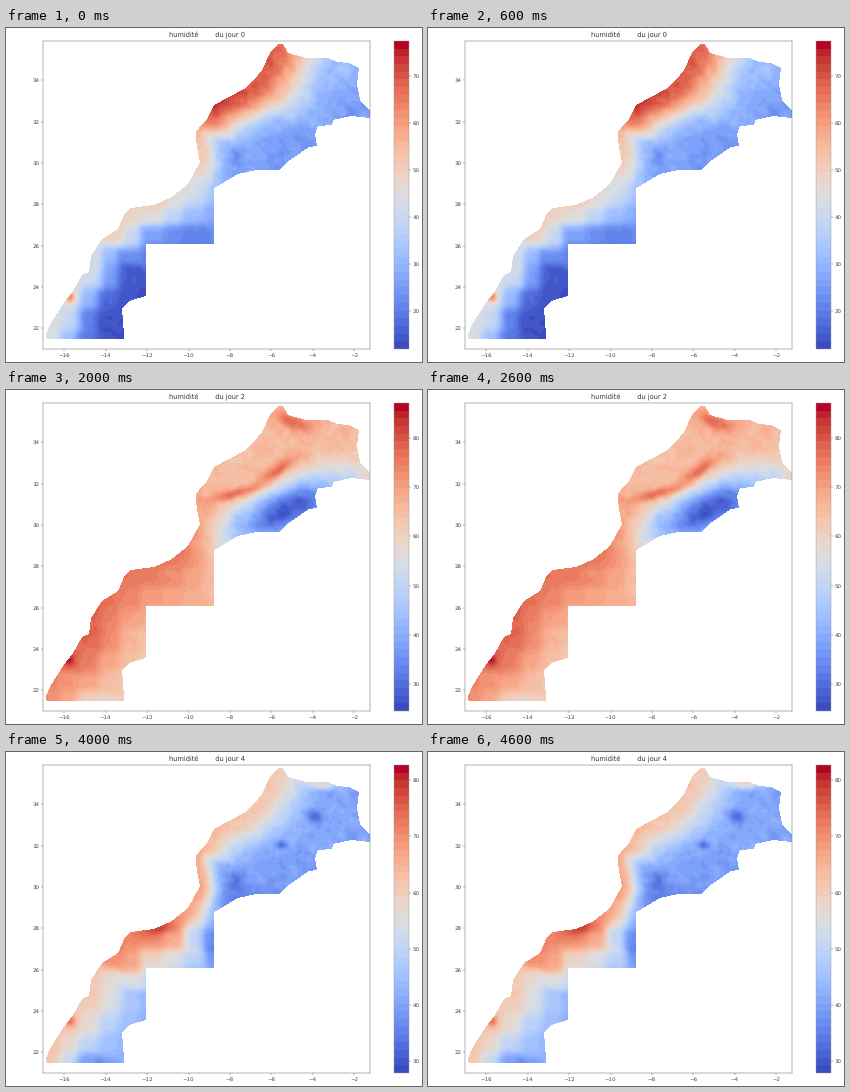
A matplotlib script that plays this animation: 416x334 px, repeating every 5000 ms.

```python
import numpy as np
import matplotlib.pyplot as plt
from matplotlib.animation import FuncAnimation
from matplotlib.path import Path
from matplotlib.ticker import MultipleLocator

W, H, DPI = 416, 334, 100
PX = 72 / DPI
LEFT, RIGHT, TOP, BOTTOM = 37, 364, 13, 321

plt.rcParams.update({
    "font.family": "DejaVu Sans", "font.size": 5.45 * PX,
    "axes.titlesize": 6.6 * PX, "axes.titlepad": 3.3 * PX,
    "axes.titlecolor": "#333333", "axes.edgecolor": "#555555",
    "axes.linewidth": 0.44 * PX, "text.hinting": "none",
})
for axis in ("xtick", "ytick"):
    plt.rcParams.update({
        f"{axis}.major.size": 1.9 * PX, f"{axis}.major.pad": 1.9 * PX,
        f"{axis}.major.width": 0.44 * PX, f"{axis}.color": "#555555",
        f"{axis}.labelcolor": "#444444",
    })

# Outline in stage pixels, clockwise from the northern tip
north = [(272, 16), (277, 16), (282, 25), (300, 30), (322, 30), (331, 34),
         (343, 35), (353, 40), (351, 56), (354, 72), (364, 83)]
border = [(364, 90), (345, 88), (327, 92), (326, 97), (312, 98), (309, 106),
          (311, 118), (303, 119), (284, 132), (273, 142), (250, 142),
          (232, 146), (208.4, 160), (208.4, 216), (139.6, 216),
          (139.6, 268), (123, 273), (116, 281), (118.4, 311)]
coast = [(41, 311), (39.5, 307), (45, 295), (57, 276), (67, 263), (76, 247),
         (83, 244), (85, 228), (96, 211), (112, 201), (119, 185),
         (125, 180), (148, 177), (165, 169.5), (182, 156), (194, 134),
         (191, 120), (189.5, 104), (201, 91), (208, 77), (238, 61),
         (248, 52), (256, 42), (264, 25)]

# Climate profile along the Atlantic coast, 0 = south-west end, 1 = north:
# percent at the shore, percent inland and reach of the sea air in pixels
STATIONS = np.array([0, 0.2, 0.42, 0.58, 0.66, 0.78, 0.95])

# Spots: x, y, long radius, short radius, tilt in degrees, strength
days = [
    dict(shore=[50, 46, 58, 50, 64, 92, 88],
         inland=[4, 2, 12, 20, 20, 20, 20],
         reach=[30, 24, 24, 30, 17, 32, 44],
         spots=[(64, 269, 4, 4, 0, 32), (345, 42, 14, 10, 0, 8)],
         span=(11.9, 77.4)),
    dict(shore=[82, 84, 78, 36, 34, 66, 76],
         inland=[18, 25, 14, 15, 9, 3, 7],
         reach=[42, 46, 30, 30, 40, 48, 54],
         spots=[(63, 270, 4, 4, 0, 14), (292, 37, 16, 5, 15, 16)],
         span=(16.4, 90.5)),
    dict(shore=[78, 85, 82, 86, 70, 64, 66],
         inland=[45, 58, 68, 62, 64, 66, 66],
         reach=[42, 40, 30, 34, 30, 40, 40],
         spots=[(282, 120, 50, 18, -25, -62), (270, 82, 17, 5, -35, 24),
                (232, 103, 20, 4, -14, 22), (287, 32, 16, 5, 20, 18),
                (63, 270, 4, 4, 0, 14)],
         span=(24.5, 87.1)),
    dict(shore=[74, 76, 68, 84, 84, 62, 62],
         inland=[17, 38, 54, 46, 14, 28, 31],
         reach=[40, 34, 40, 28, 15, 42, 42],
         spots=[(270, 92, 15, 4, -35, -22), (303, 64, 8, 4, -25, -26),
                (211, 115, 6, 3, 0, -18), (253, 92, 8, 3, -25, 14),
                (348, 62, 17, 24, 0, 32), (308, 33, 24, 8, 5, 28),
                (188, 200, 10, 13, 0, -16), (63, 270, 4, 4, 0, 18)],
         span=(25.3, 85.0)),
    dict(shore=[62, 60, 78, 72, 70, 64, 62],
         inland=[10, 25, 16, 12, 12, 21, 22],
         reach=[32, 36, 45, 25, 16, 30, 34],
         spots=[(307, 65, 6, 5, 0, -16), (276, 93, 4, 3, 0, -14),
                (318, 31, 11, 4, 5, 30), (154, 176, 15, 6, -15, 14),
                (64, 269, 4, 4, 0, 24)],
         span=(27.9, 82.7)),
]

gx, gy = np.meshgrid(np.arange(LEFT, RIGHT) + 0.5, np.arange(TOP, BOTTOM) + 0.5)
pixels = np.column_stack([gx.ravel(), gy.ravel()])
land = Path(north + border + coast).contains_points(pixels).reshape(gx.shape)


def plateau(v, centre, amount, step=21):
    """Flatten v around a regular station lattice."""
    return v - amount * np.sin(2 * np.pi * (v - centre) / step)


flat = 2.8 * np.clip((gy - 165) / 15, 0, 1)
wx = plateau(gx, 188, flat)
wy = plateau(gy, 208, flat)


def sea_distance(x, y):
    best = np.full(x.shape, np.inf)
    for (x0, y0), (x1, y1) in zip(coast, coast[1:]):
        dx, dy = x1 - x0, y1 - y0
        s = np.clip(((x - x0) * dx + (y - y0) * dy) / (dx**2 + dy**2), 0, 1)
        best = np.minimum(best, np.hypot(x - x0 - s * dx, y - y0 - s * dy))
    return best


sea = sea_distance(wx, wy)
along = ((wx - 41) * 0.617 + (311 - wy) * 0.787) / 371
near = np.exp(-((np.clip(along, 0, 1)[..., None] - STATIONS) / 0.06) ** 2)
near /= near.sum(axis=-1, keepdims=True)


def noise(seed, sigma):
    raw = np.random.default_rng(seed).normal(size=gx.shape)
    fy = np.fft.fftfreq(gx.shape[0])[:, None]
    fx = np.fft.fftfreq(gx.shape[1])[None, :]
    smooth = np.exp(-2 * (np.pi * sigma) ** 2 * (fx ** 2 + fy ** 2))
    out = np.fft.ifft2(np.fft.fft2(raw) * smooth).real
    return out / out.std()


relief = np.where(gy < 160, 1.0, 0.3) * (1.2 * noise(4, 2.2) + noise(9, 5))


def spot(x, y, a, b, tilt, strength):
    t = np.radians(tilt)
    dx, dy = gx - x, gy - y
    u = (dx * np.cos(t) + dy * np.sin(t)) / a
    v = (dy * np.cos(t) - dx * np.sin(t)) / b
    return strength * np.exp(-(u ** 2 + v ** 2) / 2)


def humidity(shore, inland, reach, spots, span):
    shore, inland, reach = (near @ np.array(p) for p in (shore, inland, reach))
    field = inland + (shore - inland) * np.exp(-(sea / reach) ** 2)
    field += relief + sum(spot(*s) for s in spots)
    low, high = span
    scaled = low + (high - low) * np.clip(field, 0, 100) / 100
    return np.where(land, scaled, np.nan)


maps = [humidity(**day) for day in days]


def box(x0, x1):
    return [x0 / W, 1 - BOTTOM / H, (x1 - x0) / W, (BOTTOM - TOP) / H]


fig = plt.figure(figsize=(W / DPI, H / DPI), dpi=DPI, facecolor="white")
ax = fig.add_axes(box(LEFT, RIGHT))
extent = [-16 + (LEFT - 58.2) / 20.72, -16 + (RIGHT - 58.2) / 20.72,
          34 - (BOTTOM - 52.3) / 20.68, 34 - (TOP - 52.3) / 20.68]
image = ax.imshow(maps[0], extent=extent, aspect="auto",
                  interpolation="nearest", cmap=plt.get_cmap("coolwarm", 40))
ax.xaxis.set_major_locator(MultipleLocator(2))
ax.yaxis.set_major_locator(MultipleLocator(2))
title = ax.set_title("")
bar = fig.colorbar(image, cax=fig.add_axes(box(388, 402.6)),
                   ticks=MultipleLocator(10))
bar.outline.set_edgecolor("#999999")


def draw(i):
    image.set_data(maps[i])
    image.set_clim(*days[i]["span"])
    title.set_text("humidité" + " " * 8 + f"du jour {i}")
    return image, title


anim = FuncAnimation(fig, draw, frames=len(days), interval=1000,
                     repeat=True, repeat_delay=0, blit=False)
plt.show()
```
